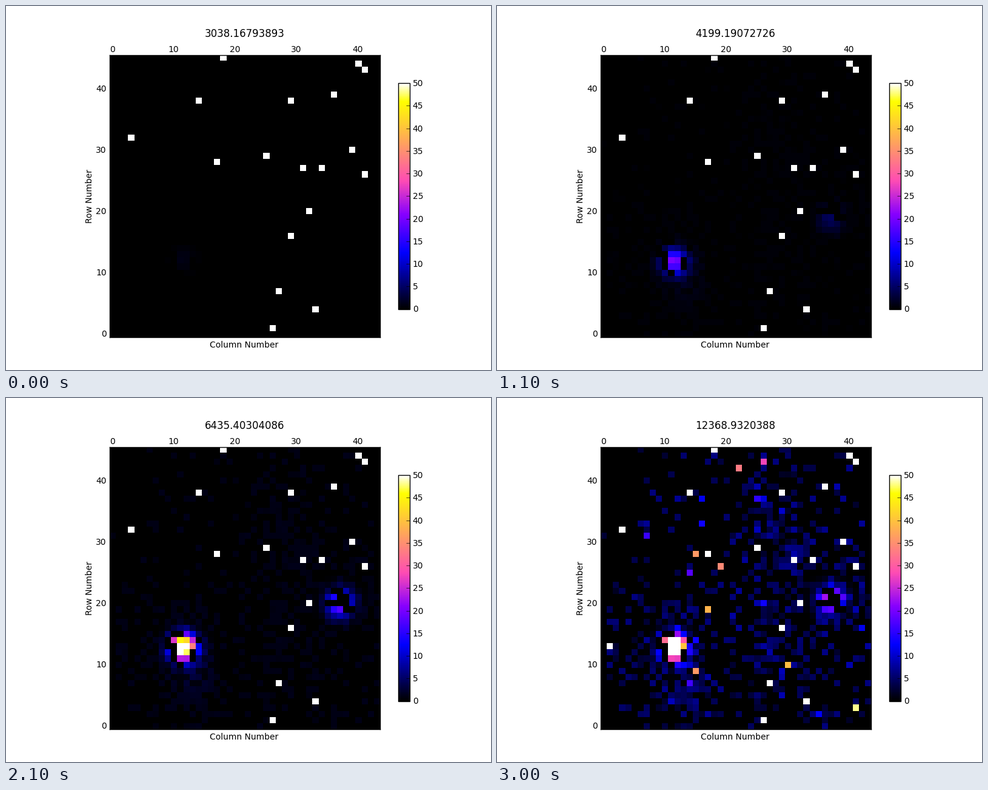
Write a matplotlib script that moves like this. It is 800 by 600 pixels and loops after 3100 ms.

```python
import numpy as np
import matplotlib.pyplot as plt
from matplotlib.animation import FuncAnimation

W, H, DPI = 800, 600, 100
COLS, ROWS, FRAMES = 44, 46, 31
LEFT, RIGHT, TOP, BOTTOM = 171, 617, 81, 546
BAR_L, BAR_R, BAR_T, BAR_B = 647, 665.6, 127.2, 499.5
PITCH = 10.108    # spacing of the axis labels per cell

plt.rcParams.update({"font.family": "DejaVu Sans", "font.size": 10,
                     "axes.linewidth": 1.0})

# Key times and the curves that run through them
KEYS = [0, 7, 15, 21, 25, 27, 30]
ENERGY = [3038.16793893, 3686.83234318, 4876.98238423, 6435.40304086,
          8178.25311943, 9459.7469283, 12368.9320388]
MAIN_PEAK = [1, 9, 45, 62, 78, 82, 75]
MAIN_Y = [12.4, 11.5, 12.1, 12.9, 13.2, 13.2, 12.9]
SIDE_PEAK = [.1, 1.8, 11, 22, 34, 42, 30]
SIDE_Y = [18.7, 18.7, 19, 20, 20.8, 21, 20.5]
NOISE = [.02, .25, .75, 1.1, 3, 5.3, 4.2]
GLOW = [.1, 1, 2.5, 2.5, 2.8, 3.2, 1]

SATURATED = [(18, 45), (40, 44), (41, 43), (36, 39), (14, 38), (29, 38),
             (3, 32), (39, 30), (25, 29), (17, 28), (31, 27), (34, 27),
             (41, 26), (32, 20), (29, 16), (27, 7), (33, 4), (26, 1)]

# Silent cells inside the two spots
DEAD = [(13, 11), (13, 12), (11, 10), (10, 11), (10, 12), (10, 13), (9, 13),
        (9, 14), (10, 15), (11, 15), (14, 14), (36, 20), (37, 20), (37, 21),
        (37, 22), (38, 19), (38, 20), (38, 21), (36, 22), (35, 20), (39, 19)]

# Regions with many lit cells: centre, radii, added share
PATCHES = [(13.5, 5, 3.5, 6, .8), (13, 18, 3.5, 2, .7), (6, 11, 5, 7, .32),
           (28, 31, 5, 14, .55), (26, 12, 6, 8, .33), (39, 20, 7, 13, .25)]

row, col = np.mgrid[:ROWS, :COLS]


def bump(x, y, rx, ry):
    return np.exp(-((col - x) / rx) ** 2 - ((row - y) / ry) ** 2)


rng = np.random.default_rng(12)
share = .09 + sum(w * bump(x, y, rx, ry) for x, y, rx, ry, w in PATCHES)
lit = rng.random((ROWS, COLS)) < share
gain = lit * rng.uniform(.85, 1.1, (ROWS, COLS))
halo = bump(12.8, 10.5, 3.2, 4.5) * np.maximum(lit, .5)


def grow(n, values):
    """Geometric interpolation between key values."""
    return np.exp(np.interp(n, KEYS, np.log(values)))


def reading(n):
    """Polynomial through the reciprocals of the key values."""
    total = 0.0
    for k, value in zip(KEYS, ENERGY):
        others = [j for j in KEYS if j != k]
        total += np.prod([(n - j) / (k - j) for j in others]) / value
    return f"{1 / total:.12g}"


def grid(n):
    noise = np.random.default_rng(100 + n)
    spread = .04 + .3 * (n / (FRAMES - 1)) ** 12
    z = gain * grow(n, NOISE) * noise.lognormal(0, spread, gain.shape)
    z += halo * grow(n, GLOW)
    z += grow(n, MAIN_PEAK) * bump(11.45, np.interp(n, KEYS, MAIN_Y),
                                   1.95, 1.95)
    z += grow(n, SIDE_PEAK) * bump(37, np.interp(n, KEYS, SIDE_Y), 2.1, 2.1)
    for c, r in DEAD:
        z[r, c] = 0
    # brief flashes become common near the end
    for _ in range(int(.8 * max(n - 25, 0) ** 2)):
        flash = 18 * noise.lognormal(0, .6)
        z[noise.integers(ROWS), noise.integers(COLS)] = flash
    for c, r in SATURATED:
        z[r, c] = 100
    return z


fig = plt.figure(figsize=(W / DPI, H / DPI), dpi=DPI, facecolor="white")


def add_box(x0, x1, y0, y1):
    return fig.add_axes([x0 / W, 1 - y1 / H, (x1 - x0) / W, (y1 - y0) / H])


def put(x, y, text, ha="center", **kw):
    return fig.text(x / W, 1 - y / H, text, ha=ha, va="baseline", **kw)


ax = add_box(LEFT, RIGHT, TOP, BOTTOM)
image = ax.imshow(grid(0), cmap="gnuplot2", vmin=0, vmax=50, origin="lower",
                  interpolation="nearest", aspect="auto")
ax.set_ylim(-.5, ROWS - .6)
ax.set_xticks([])
ax.set_yticks([])

bar = add_box(BAR_L, BAR_R, BAR_T, BAR_B)
fig.colorbar(image, cax=bar, ticks=range(0, 51, 5))
bar.tick_params(direction="in", length=4, width=.5, labelright=False)

for k in range(0, 41, 10):
    offset = (k + .5) * PITCH
    put(LEFT + offset - .8, 75.5, str(k))
    put(LEFT - 5.3, BOTTOM - offset + 4, str(k), ha="right")
for k in range(0, 51, 5):
    put(BAR_R + 5.2, BAR_B - k / 50 * (BAR_B - BAR_T) + 5, str(k), ha="left")

put(393, 563, "Column Number")
put(142, (TOP + BOTTOM) / 2, "Row Number", rotation=90,
    rotation_mode="anchor")
title = put(393.5, 51, "", fontsize=12)


def draw(n):
    image.set_data(grid(n))
    title.set_text(reading(n))
    return image, title


anim = FuncAnimation(fig, draw, frames=FRAMES, interval=100, repeat=True,
                     repeat_delay=0, blit=False)
plt.show()
```
